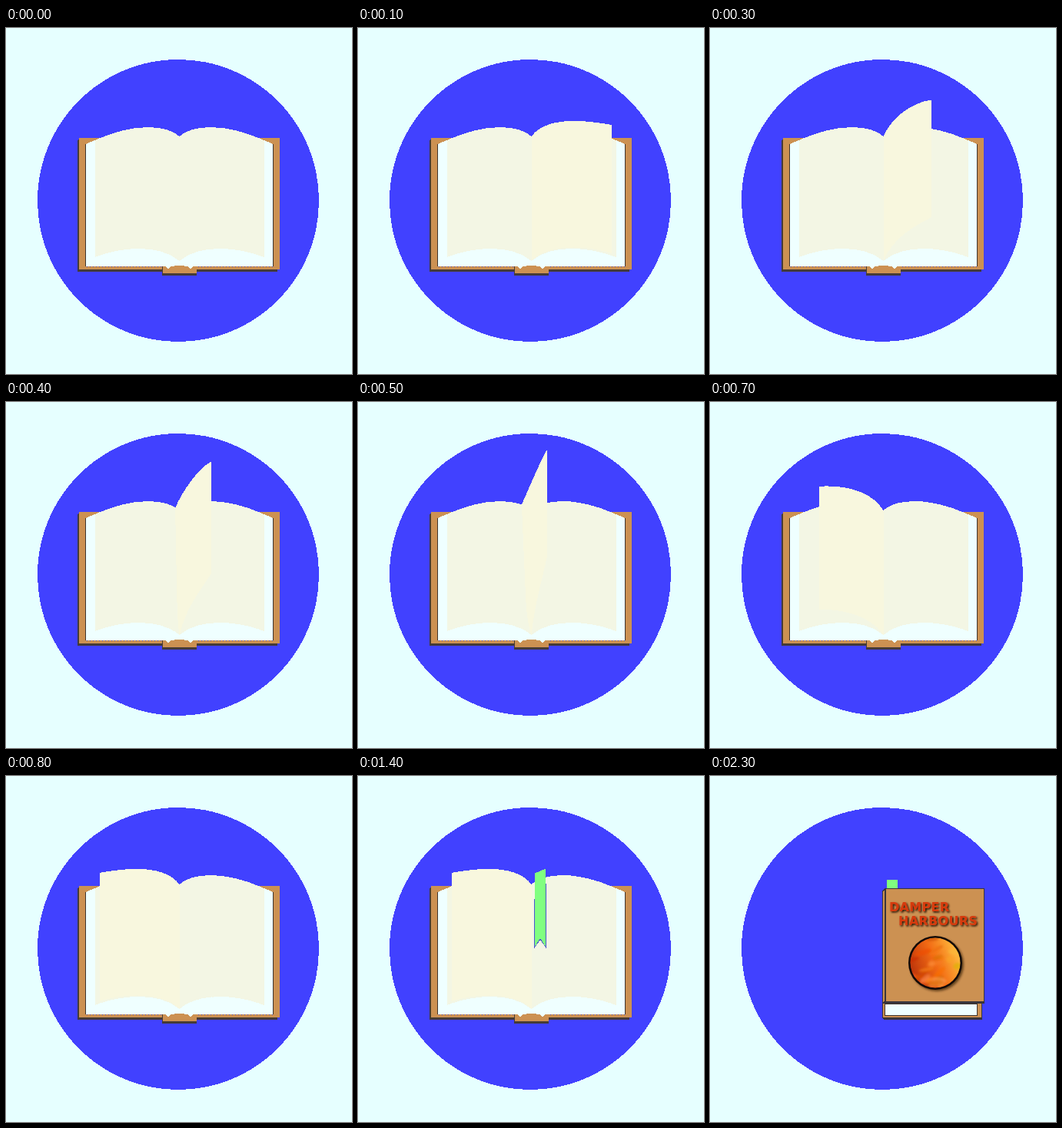
Animation of 450x450 px, one loop 3500 ms. Source, as an HTML page:

```html
<!DOCTYPE html>
<html lang="en">
<head>
<meta charset="utf-8">
<title>Turning book</title>
<style>
  html, body { margin: 0; width: 100%; height: 100%; overflow: hidden; background: #e6ffff; }
  svg { display: block; width: 100vw; height: 100vh; }
  .crisp { shape-rendering: crispEdges; }
  text { font: bold 16px "DejaVu Sans", sans-serif; letter-spacing: .3px; }
</style>
</head>
<body>
<svg viewBox="0 0 450 450">
  <defs>
    <linearGradient id="glow" x1="0" y1=".7" x2="1" y2=".3">
      <stop offset="0" stop-color="#b8300a"/>
      <stop offset=".5" stop-color="#f26a14"/>
      <stop offset="1" stop-color="#ffc040"/>
    </linearGradient>
    <filter id="soft" x="-50%" y="-50%" width="200%" height="200%">
      <feGaussianBlur stdDeviation="1.6"/>
    </filter>
    <filter id="shade" x="-20%" y="-40%" width="140%" height="200%">
      <feDropShadow dx="1.5" dy="1.5" stdDeviation=".9" flood-color="#1c0c04"/>
    </filter>
    <clipPath id="disc"><circle cx="293" cy="243" r="32.5"/></clipPath>
    <!-- right half of the open pages, spine at x = 0 -->
    <g id="half">
      <path d="M0 141C8 134 20 129 41 129C66 129 96 139 122 151V310H0Z" fill="#efffff"/>
      <path d="M0 141C8 134 20 129 41 129C63 129 88 136 110 146V298C75 284 25 281 0 303Z" fill="#f3f6e4"/>
      <path d="M122 151V310" stroke="#40342c"/>
      <path d="M20 310.5H121" stroke="#5652c8" stroke-dasharray="1 3"/>
      <path d="M0 308.5Q9 309 12 312L15 315L19 310H22V318H0Z" fill="#cc9152"/>
      <path d="M11 310H18L14.5 314Z" fill="#efffff"/>
    </g>
  </defs>

  <g class="crisp">
    <rect width="450" height="450" fill="#e6ffff"/>
    <ellipse cx="224" cy="224.5" rx="183" ry="183.5" fill="#4141ff"/>
  </g>

  <g id="open" class="crisp">
    <path d="M93 146L96 143V314H353V317H93Z" fill="#453b38"/>
    <rect x="95" y="143" width="261" height="171" fill="#cc9152"/>
    <rect x="203" y="310" width="45" height="12" fill="#453b38"/>
    <rect x="204" y="310" width="44" height="9" fill="#cc9152"/>
    <use href="#half" transform="translate(225.5)"/>
    <use href="#half" transform="translate(225.5) scale(-1 1)"/>
    <path id="sheet" fill="#f8f7de"/>
    <g id="ribbon">
      <path d="M229.5 160V223L237 212L244.5 223V140" fill="none" stroke="#4a55d0"/>
      <path d="M230 126.5L244 120.5V222L237 211L230 222Z" fill="#80ff80"/>
    </g>
  </g>

  <g id="closed">
    <g class="crisp">
      <rect x="230" y="135" width="14" height="12" fill="#80ff80"/>
      <path d="M224 150L227 146H357V296H354V317H226L224 315Z" fill="#38353c"/>
      <path d="M225 151L227 148V292L225 294Z" fill="#cc9152"/>
      <rect x="229" y="147" width="127" height="146" fill="#cc9152"/>
      <rect x="225" y="296" width="128" height="18" fill="#cc9152"/>
      <rect x="227" y="296" width="120.5" height="15" fill="#efffff" stroke="#40342c"/>
    </g>
    <g fill="#d63a10" filter="url(#shade)">
      <text x="233" y="176">DAMPER</text>
      <text x="245" y="194">HARBOURS</text>
    </g>
    <circle cx="295" cy="245" r="35" fill="#2a1206" opacity=".65" filter="url(#soft)"/>
    <circle cx="293" cy="243" r="35" fill="#120a08"/>
    <g clip-path="url(#disc)">
      <circle cx="293" cy="243" r="33" fill="url(#glow)"/>
      <g id="clouds" filter="url(#soft)"></g>
    </g>
  </g>
</svg>
<script>
const LOOP = 3500, STEP = 100, SPINE = 225.5;
const el = id => document.getElementById(id);
const show = (id, on) => el(id).style.display = on ? '' : 'none';

// Soft streaks on the planet, darker on the left
function paintClouds() {
  let seed = 11;
  const rnd = () => (seed = seed * 16807 % 2147483647) / 2147483647;
  let marks = '';
  for (let i = 0; i < 26; i++) {
    const x = 262 + 62 * rnd(), y = 212 + 62 * rnd();
    const hue = 8 + (x - 262) / 2 + 12 * rnd(), light = 40 + 26 * rnd();
    marks += `<ellipse rx="${4 + 8 * rnd()}" ry="${1.5 + 3 * rnd()}" fill="hsl(${hue} 95% ${light}%)"
      opacity=".65" transform="translate(${x} ${y}) rotate(${-50 + 60 * rnd()})"/>`;
  }
  el('clouds').innerHTML = marks;
}

// Leaf hinged at the spine; spread is 0 upright and 1 lying open
function leaf(spread) {
  const x = 104 * spread;
  const y = 45 + 81 * spread;
  const low = 176 + 117 * spread;
  const bend = 36 * Math.max(0, 0.55 - spread);
  return `M${-bend} ${141 - bend * 0.6}
    C${0.17 * x - bend * 0.7} 117 ${0.58 * x} ${y + 20 - 28 * spread} ${x} ${y}
    V${low}
    C${0.7 * x} ${low + 40 - 50 * spread} ${0.22 * x} ${256 + 24 * spread} 0 303
    Q${-bend / 2} 285 ${-bend * 0.6} 250Z`;
}

// The leaf lifts steadily on the right, then snaps over and settles on the left
function turn(step) {
  const lean = step < 6 ? (6 - step) / 5 : (3 - Math.min(step, 8)) / 5;
  el('sheet').setAttribute('d', leaf(Math.abs(lean)));
  el('sheet').setAttribute('transform', `translate(${SPINE}) scale(${Math.sign(lean)} 1)`);
}

function draw(t) {
  const step = Math.floor(t / STEP);
  const shut = t >= 2300;
  show('open', !shut);
  show('closed', shut);
  show('ribbon', t >= 1400);
  show('sheet', step > 0);
  turn(step);
}

const start = performance.now();
function tick(now) {
  draw(Math.max(0, now - start) % LOOP);
  requestAnimationFrame(tick);
}
paintClouds();
draw(0);
requestAnimationFrame(tick);
</script>
</body>
</html>
```
